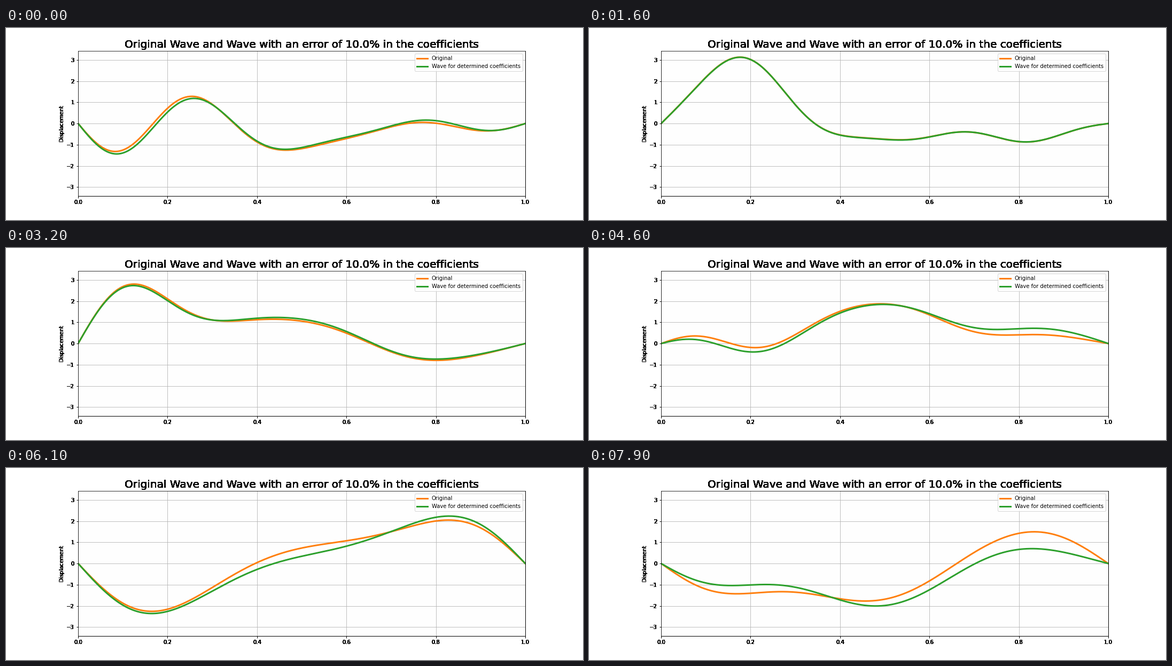
These frames come from a looping animation (1080x360 px, 8 s). A matplotlib script:

```python
import numpy as np
import matplotlib.pyplot as plt
from matplotlib.animation import FuncAnimation

FRAMES, STEP = 80, 0.1

# Steady swing: odd harmonics cross zero at T0 while even ones peak
T0, OMEGA = 6.65, 0.73
SWING = {1: -1.16, 2: -2.1, 3: 0.78, 4: -0.68, 5: -0.187, 6: -0.1}

# Fading part, per harmonic: amplitude, rate, time of its crest (s)
FADE = 4.2
RIPPLE = {
    1: (0.80, 0.45, 1.0),
    2: (-0.85, 0.85, 2.6),
    3: (1.25, 0.58, 3.3),
    4: (0.28, 0.86, 2.2),
    5: (0.70, 0.73, 3.3),
    6: (0.40, 0.72, 4.5),
    7: (0.30, 0.75, 4.2),
    8: (0.22, 1.05, 4.4),
}


def wave(x, t):
    """Displacement of a string pinned at 0 and 1."""
    phase = OMEGA * (t - T0)
    y = sum(a * np.sin(n * np.pi * x) * (np.sin(phase) if n % 2 else np.cos(phase))
            for n, a in SWING.items())
    ripple = sum(a * np.sin(n * np.pi * x) * np.cos(rate * (t - crest))
                 for n, (a, rate, crest) in RIPPLE.items())
    return y + ripple * np.exp(-(t / FADE) ** 2)


def mistuned(x, t):
    """The same wave running fast, more so towards the right end."""
    return wave(x, t + (t - 1.8) * (0.03 + 0.07 * x))


def overprint(text, times=20):
    """Draw a text several times over for a heavy, hard edge."""
    draw = text.draw

    def repeat(renderer):
        for _ in range(times):
            draw(renderer)

    text.draw = repeat


x = np.linspace(0, 1, 401)

plt.rcParams["font.family"] = "DejaVu Sans"
fig = plt.figure(figsize=(15, 5), dpi=72, facecolor="white")
ax = fig.add_axes([0.125, 0.125, 0.775, 0.755], facecolor="#fefefe")
ax.set_xlim(0, 1)
ax.set_ylim(-3.42, 3.42)
ax.set_xticks(np.linspace(0, 1, 6))
ax.set_yticks(range(-3, 4))
ax.tick_params(width=1)
ax.spines[["right", "bottom"]].set_linewidth(1)
ax.grid(True)
ax.set_title("Original Wave and Wave with an error of 10.0% in the coefficients",
             fontsize=20)
ax.set_ylabel("Displacement")
for label in [ax.title, ax.yaxis.label, *ax.get_xticklabels(), *ax.get_yticklabels()]:
    overprint(label)

exact_line, = ax.plot(x, wave(x, 0), color="C1", lw=3, label="Original")
approx_line, = ax.plot(x, mistuned(x, 0), color="C2", lw=3,
                       label="Wave for determined coefficients")
ax.legend(loc="upper right")


def update(i):
    exact_line.set_ydata(wave(x, i * STEP))
    approx_line.set_ydata(mistuned(x, i * STEP))
    return exact_line, approx_line


anim = FuncAnimation(fig, update, frames=FRAMES, interval=1000 * STEP,
                     repeat=True, repeat_delay=0)
plt.show()
```
